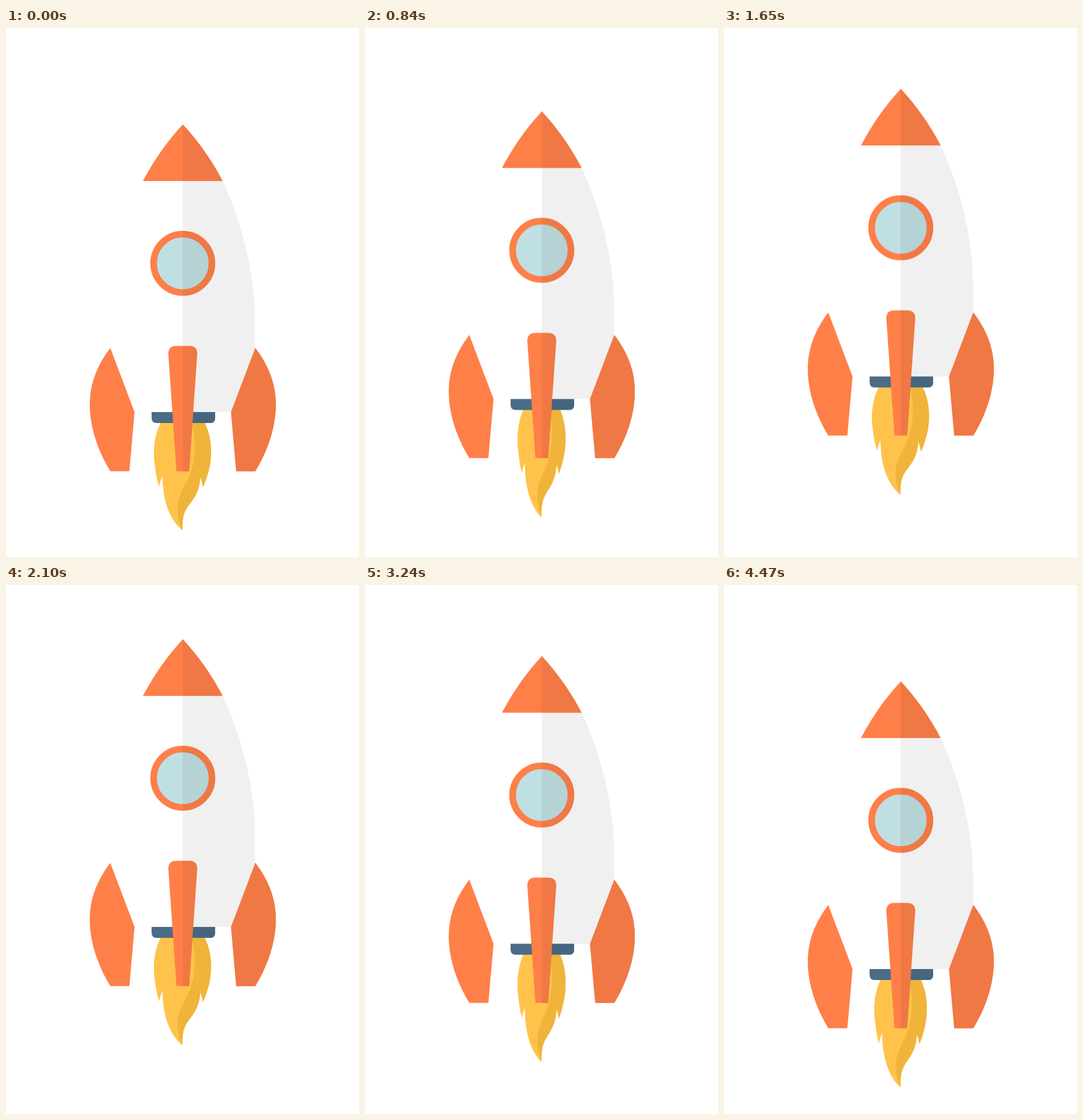
These frames come from a looping animation (611x916 px, 4.5 s). An HTML page without scripts:

```html
<!DOCTYPE html>
<html lang="en">
<head>
<meta charset="utf-8">
<title>Rocket</title>
<style>
  @property --phase {
    syntax: "<angle>";
    inherits: false;
    initial-value: 0deg;
  }
  html, body { margin: 0; width: 100%; height: 100%; overflow: hidden; background: #fff; }
  svg { display: block; width: 611px; height: 916px; }

  .rocket {
    transform: translateY(calc((cos(var(--phase)) - 1) * 36.9px));
    animation: hover 4.5s steps(150) infinite;
  }
  .flame {
    transform-origin: 306px 684px;
    animation: flicker .15s step-end infinite;
  }
  .shade { filter: brightness(.943); }

  @keyframes hover { to { --phase: 360deg; } }
  @keyframes flicker {
    0% { transform: scaleX(1); }
    20%, 80% { transform: scaleX(.92); }
    40% { transform: scaleX(.84); }
  }
</style>
</head>
<body>
<svg viewBox="0 0 611 916">
  <defs>
    <clipPath id="right-half"><path d="M306 150H480V790H306Z"/></clipPath>
    <path id="fin" d="M180.500 554L222.500 665L213.500 767.500H180.500C159 732 145 692 145 652C145 615 158 584 180.500 554Z"/>
    <g id="hull">
      <path fill="#fff" d="M237 265H375C408 335 431 425 431 505V554L389.500 665H222.500L181 554V505C181 425 204 335 237 265Z"/>
      <g fill="#ff7f48">
        <path d="M306 167Q346 210 375 265H237Q266 210 306 167Z"/>
        <use href="#fin"/>
        <use href="#fin" transform="matrix(-1 0 0 1 612 0)"/>
      </g>
      <circle cx="306" cy="407.500" r="50.500" fill="#c0dfe2" stroke="#ff7f48" stroke-width="11.500"/>
      <path fill="#4a6c87" d="M252 665H362V675Q362 684 353 684H261Q252 684 252 675Z"/>
      <path fill="#ff7f48" d="M295 550.500H317Q331.500 550.500 331 565L317 767.500H295L281 565Q280.500 550.500 295 550.500Z"/>
    </g>
  </defs>

  <g class="rocket">
    <g class="flame">
      <path fill="#ffc34b" d="M272 676C257 700 253 730 258 760Q260 778 265 794Q267 783 271 776C271 822 285 853 305.500 870C305 849 307 838 319 823C330 809 336 795 336 778Q340 786 341 795Q349 777 353 757C358 728 354 700 340 676Z"/>
      <path fill="#efb439" d="M320 676C333 722 327 764 309 793C294 818 293 843 305.500 870C305 849 307 838 319 823C330 809 336 795 336 778Q340 786 341 795Q349 777 353 757C358 728 354 700 340 676Z"/>
    </g>
    <use href="#hull"/>
    <g clip-path="url(#right-half)"><use class="shade" href="#hull"/></g>
  </g>
</svg>
</body>
</html>
```
